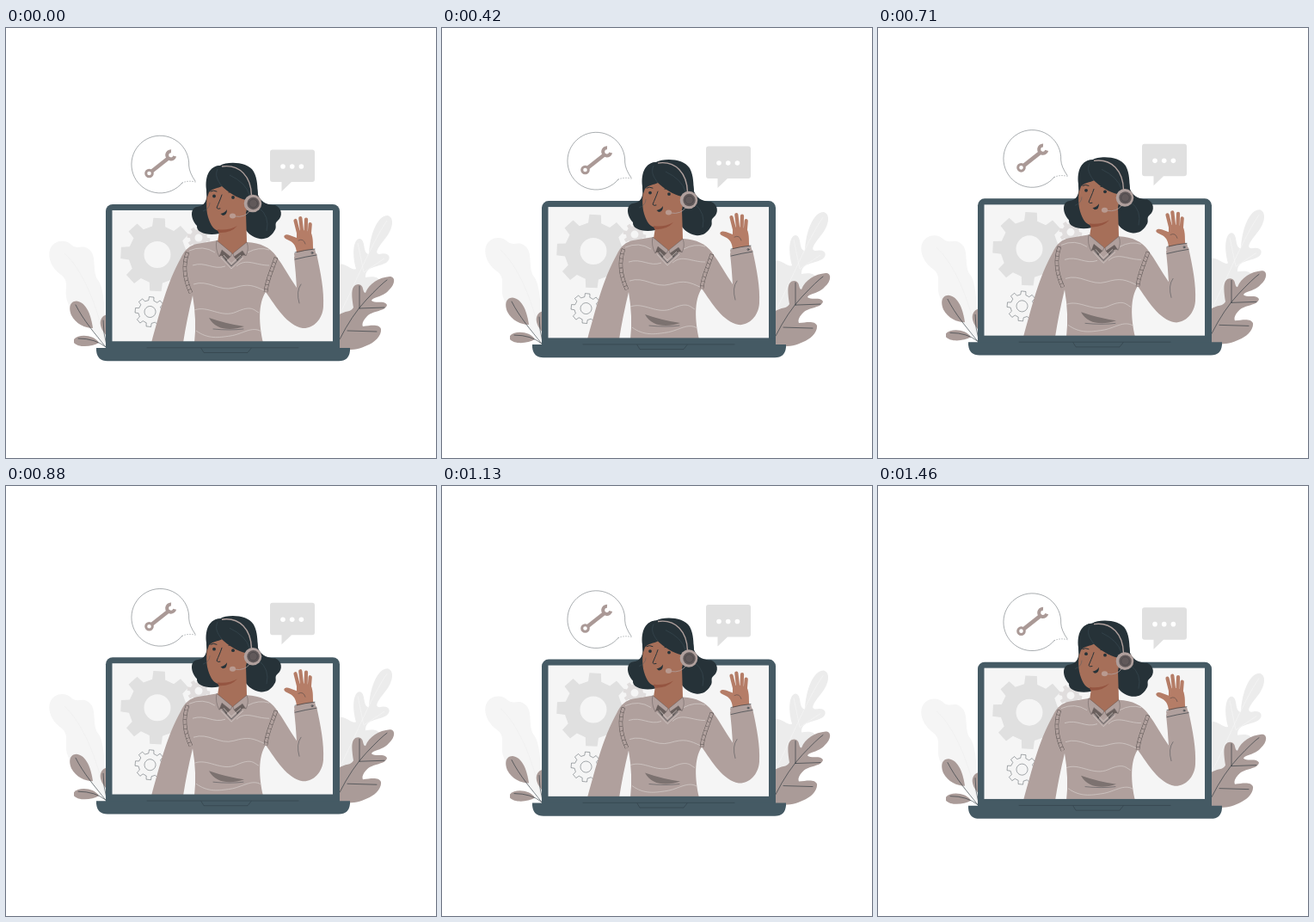
An HTML page that plays this animation: 500 by 500 pixels, repeating every 1.5 s.

```html
<!DOCTYPE html>
<html lang="en">
<head>
<meta charset="utf-8">
<title>Support call</title>
<style>
  html, body { margin: 0; width: 100%; height: 100%; overflow: hidden; background: #fff; }
  svg { display: block; width: 100vw; height: 100vh; }
  .wool { fill: #b0a09d; }
  .leaf { fill: #aa9b98; }
  .face { fill: #a66f59; }
  .hand { fill: #b57d67; }
  .hair { fill: #263238; }
  .metal { fill: #455a64; }
  .grey { fill: #e0e0e0; }
  .ink { fill: none; stroke: #263238; stroke-width: .6; stroke-linecap: round; stroke-linejoin: round; }
  .fine { stroke-width: .4; }
  .bold { stroke-width: 1; }
  .knit { fill: none; stroke: #d6cecc; stroke-width: .7; }
</style>
</head>
<body>
<svg viewBox="0 0 500 500">
  <defs>
    <path id="seamL" d="M211 261C206 275 207 291 215 308"/>
    <path id="seamR" d="M314 267C308 285 303 294 302 307"/>
  </defs>
  <g id="scene">
    <g id="backPlants">
      <path fill="#f5f5f5" d="M117 370C100 350 72 332 70 312C69 300 73 294 64 287C54 280 48 268 51 258C55 246 70 245 77 253C85 258 88 251 96 257C106 264 100 280 106 292C115 302 113 325 117 340Z"/>
      <path fill="none" stroke="#ececec" stroke-width=".6" d="M68 262C88 280 106 320 116 370"/>
      <path fill="#ececec" d="M386 345V275C395 272 402 283 407 280C402 262 404 246 411 245C419 246 414 262 422 263C423 242 431 218 444 218C453 221 449 236 440 246C433 255 428 262 434 263C446 260 449 268 442 273C430 279 418 277 418 290C428 288 437 290 433 297C420 310 408 330 386 345Z"/>
      <path fill="none" stroke="#f7f7f7" stroke-width=".6" d="M388 333C405 300 425 250 443 224M409 250L416 284L440 268"/>
    </g>

    <g id="frontPlants">
      <g class="leaf">
        <path d="M101 349C99 335 94 319 82 317.5C73 318 73 327 76 334C81 344 92 349 101 349Z"/>
        <path d="M79 362C85 355 103 357 108 366C100 371 84 372 79 366Z"/>
        <path d="M118 333C108 335 106 347 118 359Z"/>
        <path d="M386 334C395 328 401 331 404 325C402 312 400 298 410 298C417 299 414 308 418 308C422 297 434 290 446 289C454 289 452 299 445 305C438 313 426 313 425 317C430 321 440 316 443 322C441 330 427 328 420 335C414 341 414 345 415 347C424 346 434 344 436 350C437 358 428 366 420 369C410 374 400 375 386 374Z"/>
      </g>
      <path class="ink" d="M81 322C90 340 104 356 116 371M84 361Q104 361 116 371M113 340Q113 355 117 369M388 362Q402 334 419 316T443 293M411 326L411 300M411 326L440 325M397 352L431 353"/>
    </g>

    <rect class="metal" x="116" y="205" width="272" height="170" rx="8"/>
    <rect fill="#f5f5f5" x="123.5" y="212" width="256.5" height="153"/>

    <path id="gearBig" class="grey" fill-rule="evenodd"/>
    <path id="gearTiny" fill="#e0dddd" fill-rule="evenodd"/>
    <path id="gearLine" class="ink fine" stroke-dasharray="3 .7"/>

    <g id="woman">
      <path class="hair" d="M249 160C257 155 281 155 288 167C293 176 292 186 293 194C297 204 306 206 313 206C321 209 322 219 316 224C311 228 316 231 312 236C308 243 302 246 295 245C286 243 282 239 279 235L248 239C235 242 221 238 222 230C214 222 214 209 222 208C231 207 235 200 233 188C231 172 237 160 249 160Z"/>
      <path class="wool" d="M169 366C180 327 187 297 203 268C208 257 214 253 222 251L246 247L263 262L280 249C296 250 307 255 314 265C323 277 329 289 338 302Q337 285 335 266L361 262C366 285 370 305 369 324C368 340 356 350 345 349C327 346 314 324 302 307C293 320 294 345 299 366H219Q222 340 217 311Q210 340 206 366Z"/>
      <path class="face" d="M236 182C233 196 232 210 235 220C238 230 242 235 248 236L246 249C251 258 259 262 264 263C271 260 277 256 280 249L279 215L283 196L262 178Z"/>
      <path fill="#955541" d="M246 234Q258 236 269 230Q261 239 247 238Z"/>
      <path class="hair" d="M234 197C231 178 235 161 249 160C280 153 292 172 293 195C293 205 286 215 283 220C280 212 281 205 279 200C269 198 257 190 251 184C247 186 239 187 236 191Z"/>
      <path fill="none" stroke="#455a64" stroke-width=".4" d="M251 184C245 176 243 171 246 164M260 171Q279 180 283 194M294 209Q307 219 303 236M229 213Q237 210 237 203"/>

      <g id="face">
        <circle class="hair" cx="242" cy="195.5" r="1.9"/>
        <circle class="hair" cx="264" cy="197" r="1.9"/>
        <path class="ink bold" d="M238 190Q241 188 245 190M259 191Q265 189 269 193"/>
        <path class="ink bold" d="M251 194C249 200 247 204 245 209Q246 211 249 210"/>
        <path class="hair" d="M249.5 216Q254.5 215 257 211Q257 218 252 218Z"/>
      </g>

      <g id="headset">
        <path fill="none" stroke="#b0a09d" stroke-width="1.4" d="M251 161C272 158 285 173 285.5 195"/>
        <path fill="none" stroke="#b0a09d" stroke-width=".8" d="M284 212Q278 221 266 219"/>
        <ellipse cx="263.5" cy="218.5" rx="3.6" ry="3" fill="#b99a90"/>
        <circle cx="287" cy="204" r="10.3" fill="#b0a09d"/>
        <circle cx="287.5" cy="204" r="7.2" fill="#61595a"/>
        <circle cx="287.5" cy="204" r="4.8" fill="none" stroke="#494648" stroke-width=".8"/>
      </g>

      <g id="collar">
        <path fill="#695f5d" d="M251 258L261 266L256 271Q252 262 248 266ZM275 259L265 266L269 271Q274 262 279 265Z"/>
        <path class="wool" stroke="#544d4d" stroke-width=".4" d="M245 247L263 262L261 266L251 258L248 266Q243 257 245 247ZM280 249L264 262L265 266L275 259L279 265Q283 257 280 249Z"/>
        <path class="knit" d="M250 267L262 280L276 267M253 264L262 274L273 264"/>
        <path class="ink" d="M252 266L262 277L274 266"/>
      </g>

      <path class="knit" d="M213 259Q229 252 243 261M281 261Q294 254 306 258M217 276C232 271 241 282 255 277M268 277C279 267 290 276 306 276M218 298C235 292 248 307 265 302S287 299 302 306M219 328C235 322 250 338 268 330S288 328 294 331M221 352C235 362 247 360 261 358S286 346 297 353"/>
      <path fill="#7c7270" d="M236 337Q256 344 277 347C262 352 244 352 236 337Z"/>
      <path class="ink fine" d="M241 350Q260 352 276 350M343 298Q337 306 341 320"/>

      <g fill="none" id="seams"></g>

      <g id="hand">
        <path fill="none" stroke="#b57d67" stroke-width="4.2" stroke-linecap="round" d="M341 242L336.5 224M344.5 240L342.3 221M348.5 240L349 222.5M352.5 243L353.7 228"/>
        <path class="hand" d="M338 237C341 234 354 235 355.5 240C358 249 356 254 358 260L338 264C338 256 336 251 331 248L325 245C321 242 325 239 330 241L338 244Z"/>
        <path class="ink fine" d="M340 247Q346 244 348 251"/>
        <path class="wool" d="M335 262Q348 258 359 257L361 265L336 270Z"/>
        <path class="ink" d="M336 269Q348 266 361 264M336 261Q348 258 359 257"/>
        <circle class="ink" cx="356" cy="261.5" r="1"/>
      </g>
    </g>

    <g id="base">
      <rect class="metal" x="116" y="364.3" width="272" height="9"/>
      <path class="metal" d="M105 372H400V375Q399 387.2 387 387.2H118Q106 387.2 105 375Z"/>
      <path class="ink fine" d="M164 371.8H340M227 372.5L230 377.5H281L285 372.5"/>
    </g>

    <g id="wrenchBubble">
      <path class="ink fine" d="M205 180A33.4 33.4 0 1 1 212.7 160Q213 168 220 178"/>
      <path class="ink fine" stroke-dasharray=".5 2.5" d="M205 180Q212 177 220 179"/>
      <g fill="none" stroke="#aa9996">
        <circle cx="166.5" cy="169" r="3.8" stroke-width="3"/>
        <path stroke-width="4.5" d="M169 167L188 152"/>
        <path stroke-width="4" d="M192 143.2A4.6 4.6 0 1 0 196.2 149"/>
      </g>
    </g>

    <g id="chatBubble">
      <path class="grey" d="M310 141.5H356Q359 141.5 359 144.5V176Q359 179 356 179H332L320.5 190V179H310Q307 179 307 176V144.5Q307 141.5 310 141.5Z"/>
      <g fill="#fff">
        <circle cx="322" cy="161" r="2.8"/>
        <circle cx="332.7" cy="161" r="2.8"/>
        <circle cx="343.4" cy="161" r="2.8"/>
      </g>
    </g>
  </g>
</svg>
<script>
const LOOP = 1500, LIFT = 7;
const byId = id => document.getElementById(id);

function gear(id, cx, cy, outer, inner, hole, turn) {
  const teeth = 8, step = 2 * Math.PI / teeth, points = [];
  for (let i = 0; i < teeth; i++) {
    for (const [r, a] of [[inner, -.29], [outer, -.2], [outer, .2], [inner, .29]]) {
      const angle = (i + a) * step + turn;
      points.push((cx + r * Math.sin(angle)).toFixed(2) + ' ' + (cy - r * Math.cos(angle)).toFixed(2));
    }
  }
  const ring = `M${cx - hole} ${cy}a${hole} ${hole} 0 1 0 ${2 * hole} 0a${hole} ${hole} 0 1 0 ${-2 * hole} 0Z`;
  byId(id).setAttribute('d', `M${points.join('L')}Z${ring}`);
}
gear('gearBig', 176, 263.5, 43, 33.5, 15.5, .05);
gear('gearTiny', 224, 244, 13.5, 10, 4.5, .2);
gear('gearLine', 167.5, 330, 17.5, 13.5, 6.5, .1);

// Each seam is an outlined band crossed by short rungs.
byId('seams').innerHTML = ['seamL', 'seamR'].map(id => `
  <use href="#${id}" stroke="#57504f" stroke-width="4.4"/>
  <use href="#${id}" stroke="#b0a09d" stroke-width="3.5"/>
  <use href="#${id}" stroke="#57504f" stroke-width="3.5" stroke-dasharray=".5 5"/>`).join('');

function draw(now) {
  const phase = now % LOOP / LOOP;
  const lift = LIFT * (1 - Math.abs(1 - 2 * phase));
  byId('scene').setAttribute('transform', `translate(0 ${-lift})`);
  requestAnimationFrame(draw);
}
draw(performance.now());
</script>
</body>
</html>
```
